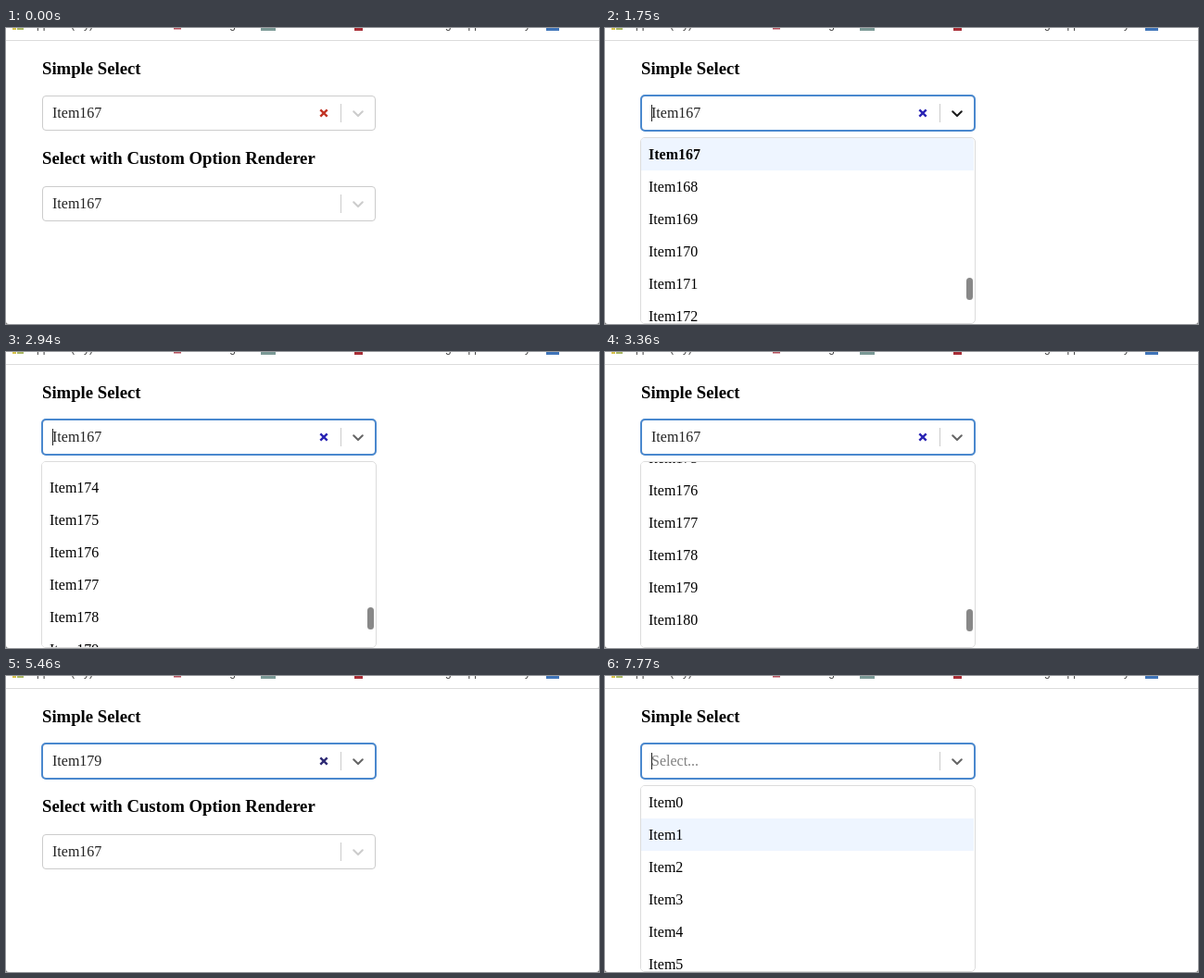
An HTML page that plays this animation: 640 by 320 pixels, repeating every 8000 ms.

```html
<!DOCTYPE html>
<html lang="en">
<head>
<meta charset="utf-8">
<title>Select demo</title>
<style>
  html, body { margin: 0; width: 100%; height: 100%; overflow: hidden; background: #fff; }
  svg { display: block; width: 640px; height: 320px; }
  text { font: 16px "Liberation Serif", "Times New Roman", serif; }
  .heading { font-size: 18.72px; font-weight: bold; }
  .bookmark { font: 12px "Liberation Sans", Arial, sans-serif; fill: #444; }
  .value { fill: #222; }
  .frame { fill: #fff; stroke: #ccc; }
  .chevron { fill: none; stroke: #ccc; stroke-width: 2.1; stroke-linecap: round; stroke-linejoin: round; }
  .separator { fill: #ccc; }
</style>
</head>
<body>
<svg viewBox="0 0 640 320">
  <defs>
    <clipPath id="menuClip"><rect x="39" y="119" width="359" height="200" rx="4"/></clipPath>
    <g id="control">
      <rect class="frame" x="39.5" y=".5" width="359" height="37" rx="3.5"/>
      <rect class="separator" x="361" y="9" width="1" height="20"/>
    </g>
    <path id="arrow" d="M375.2 17.3l4.8 4.6 4.8-4.6"/>
  </defs>

  <g id="bookmarks">
    <rect x="7" width="4" height="2" fill="#d8c24a"/>
    <rect x="12" width="7" height="2" fill="#a9b763"/>
    <text class="bookmark" x="25" y="0">Apps</text>
    <text class="bookmark" x="70" y="0">(my)</text>
    <rect x="181" width="8" height="1.5" fill="#b5505c"/>
    <text class="bookmark" x="248" y="0" text-anchor="end">Reading</text>
    <rect x="275" width="16" height="3" fill="#7b9996"/>
    <rect x="376" width="9" height="3" fill="#a82d36"/>
    <text class="bookmark" x="566" y="0" text-anchor="end">Learning Support Library</text>
    <rect x="583" width="14" height="3" fill="#3f74b8"/>
    <rect y="13" width="640" height="1" fill="#dcdcdc"/>
  </g>

  <text class="heading" x="39" y="50">Simple Select</text>
  <use href="#control" y="73"/>
  <rect id="focusRing" x="39" y="73" width="360" height="38" rx="4" fill="none" stroke="#4a88ce" stroke-width="2"/>
  <text id="value" x="50" y="97"></text>
  <path id="clear" d="M339.3 88.3l7.4 7.4m0-7.4l-7.4 7.4" stroke-width="2.4"/>
  <use id="chevron" class="chevron" href="#arrow" y="73"/>
  <rect id="caret" x="50" y="83" width="1" height="18" fill="#222"/>

  <text class="heading" x="39" y="147">Select with Custom Option Renderer</text>
  <use href="#control" y="171"/>
  <text class="value" x="50" y="195">Item167</text>
  <use class="chevron" href="#arrow" y="171"/>

  <g id="menu">
    <rect x="38.5" y="118.5" width="361" height="201" rx="4.5" fill="#fff" stroke="#dcdcdc"/>
    <g id="rows" clip-path="url(#menuClip)"></g>
    <rect id="thumb" x="390" width="7" height="24" rx="3.5" fill="#888"/>
  </g>

  <path d="M0 317v3h3q-3 0-3-3M640 317v3h-3q3 0 3-3" fill="#777"/>
</svg>
<script>
  const DURATION = 8000, STEP = 70, ROW_HEIGHT = 35, MENU_TOP = 119;
  const OPEN = 1750, PICK = 4480, CLEAR = 6230, REOPEN = 7280;
  const SCROLL = [[2240, 0], [2380, 18], [2660, 123], [2870, 213], [2940, 235], [3010, 236],
                  [3150, 236], [3220, 252], [3290, 280], [3360, 302], [3430, 314]];
  const THUMB_FADE = [[4130, 1], [4410, 0]];
  const HOVERED = [[OPEN, 167], [3430, 178], [3640, 179], [REOPEN, 0], [7770, 1]];
  const CARET = [[0, 0], [OPEN, 1], [2240, 0], [2800, 1], [3290, 0], [3780, 1], [4270, 0], [7560, 1]];
  const CHEVRON = [[0, '#ccc'], [OPEN, '#1c1c1c'], [2170, '#666']];
  const CLEAR_COLOR = [[0, '#c23526'], [OPEN, '#2a24b4'], [5460, '#2f2b75'], [5530, '#333']];
  const VALUE = [[0, 'Item167'], [PICK, 'Item179'], [CLEAR, 'Select...']];

  const el = id => document.getElementById(id);
  const show = (node, visible) => node.setAttribute('visibility', visible ? 'inherit' : 'hidden');

  // Latest value set at or before t.
  const held = (keys, t) => keys.reduce((value, [at, next]) => t >= at ? next : value, null);

  // Linear interpolation between [time, value] points.
  function ramp(points, t) {
    const i = points.findIndex(([at]) => at > t);
    if (i === 0) return points[0][1];
    if (i < 0) return points[points.length - 1][1];
    const [t0, v0] = points[i - 1], [t1, v1] = points[i];
    return v0 + (v1 - v0) * (t - t0) / (t1 - t0);
  }

  function add(parent, name, attributes) {
    const node = document.createElementNS('http://www.w3.org/2000/svg', name);
    for (const key in attributes) node.setAttribute(key, attributes[key]);
    return parent.appendChild(node);
  }

  const rows = Array.from({ length: 7 }, () => ({
    back: add(el('rows'), 'rect', { x: 39, width: 360, height: ROW_HEIGHT }),
    label: add(el('rows'), 'text', { x: 47 })
  }));

  function drawMenu(t) {
    const firstOpening = t < PICK;
    const scroll = firstOpening ? Math.round(ramp(SCROLL, t)) : 0;
    const firstItem = (firstOpening ? 167 : 0) + Math.floor(scroll / ROW_HEIGHT);
    const hovered = held(HOVERED, t);
    rows.forEach(({ back, label }, i) => {
      const item = firstItem + i;
      const y = MENU_TOP + i * ROW_HEIGHT - scroll % ROW_HEIGHT;
      back.setAttribute('y', y);
      back.setAttribute('fill', item === hovered ? '#eef5ff' : '#fff');
      label.setAttribute('y', y + 23);
      label.style.fontWeight = item === 167 ? 'bold' : 'normal';
      label.textContent = 'Item' + item;
    });
    el('thumb').setAttribute('y', 270 + Math.round(scroll * 6 / 235));
    el('thumb').setAttribute('opacity', firstOpening ? ramp(THUMB_FADE, t) : 0);
  }

  function draw(t) {
    const menuOpen = t >= OPEN && t < PICK || t >= REOPEN;
    show(el('focusRing'), t >= OPEN);
    show(el('caret'), held(CARET, t));
    show(el('clear'), t < CLEAR);
    show(el('menu'), menuOpen);
    el('clear').setAttribute('stroke', held(CLEAR_COLOR, t));
    el('chevron').style.stroke = held(CHEVRON, t);
    el('value').textContent = held(VALUE, t);
    el('value').setAttribute('fill', t < CLEAR ? '#222' : '#808080');
    if (menuOpen) drawMenu(t);
  }

  const start = performance.now();
  function tick() {
    const t = (performance.now() - start) % DURATION;
    draw(Math.floor(t / STEP) * STEP);
    requestAnimationFrame(tick);
  }
  tick();
</script>
</body>
</html>
```
